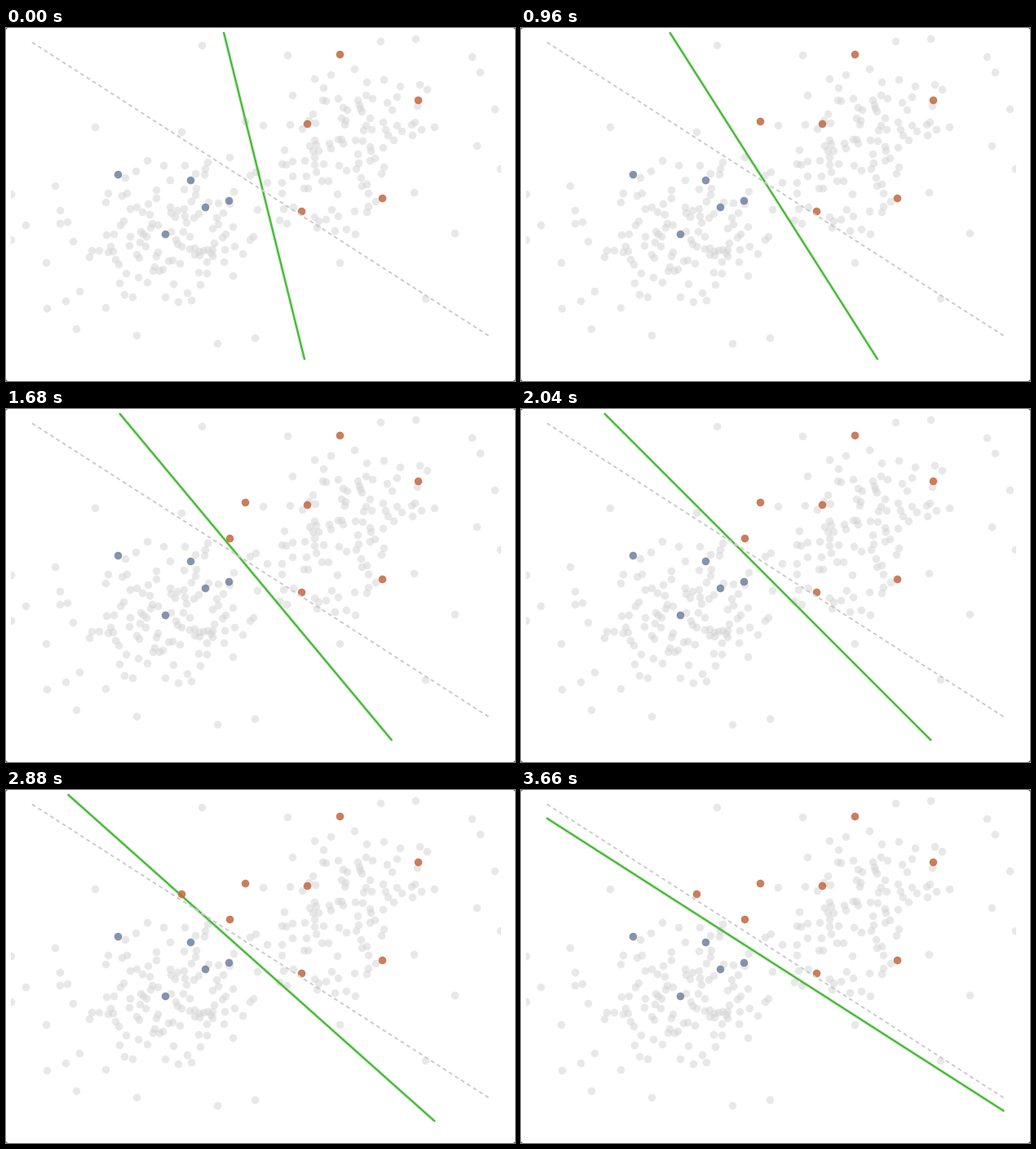
Animation of 624x432 px, one loop 3.72 s. Source, as a matplotlib script:

```python
import numpy as np
import matplotlib.pyplot as plt
from matplotlib.animation import FuncAnimation
from matplotlib.patches import FancyBboxPatch, Rectangle

W, H, DPI = 624, 432, 100
STEP, FRAMES = 60, 62
TURN = 1020  # ms for one swing of the boundary
PT = 72 / DPI  # points per pixel

GREY, RED, BLUE, GREEN = "#d3d3d3", "#c0683f", "#6f80a0", "#45b835"
LEFT, RIGHT, TOP, BOTTOM, MID = 32, 591.5, 6, 405, 206

reds = [(408.5, 31.5), (505, 88), (369, 116.5), (461, 207.5), (362, 223.5)]
blues = [(137, 178.5), (226, 186), (243.5, 218.5), (273, 210.5), (195, 251.5)]

# Newly labelled points: time, x, y; each one starts a swing
queries = [(240, 293, 113.5), (1320, 274, 158), (2640, 215, 127)]

# Boundary poses: angle from the vertical in degrees, x at mid height
poses = np.array([(13.9, 316.6), (37.1, 308.5), (47, 301.6), (57.4, 299.8)])

# Loners on the rim of the clouds
rim = [(240, 21), (345, 33), (459, 16), (502, 13), (571, 35), (581, 54),
       (599, 99), (577, 144), (606, 172), (550, 251), (514, 331), (409, 287),
       (305, 379), (259, 386), (160, 376), (86, 368), (50, 343), (24, 241),
       (6, 203), (6, 259), (60, 193), (109, 121)]


def cloud(rng, n, center, spread, tilt, reach=2.2, gap=4):
    """Tilted Gaussian cloud without far tails, dots kept slightly apart."""
    pts = reds + blues + [q[1:] for q in queries]
    skip = len(pts)
    while len(pts) < skip + n:
        u, v = rng.normal(size=2)
        p = (center[0] + spread[0] * u, center[1] + spread[1] * (v + tilt * u))
        near = np.hypot(*(np.array(pts) - p).T).min()
        if np.hypot(u, v) < reach and near > gap:
            pts.append(p)
    return pts[skip:]


def boundary(now):
    pose = poses[0].copy()
    for (start, _, _), change in zip(queries, np.diff(poses, axis=0)):
        p = np.clip((now - start) / TURN, 0, 1)
        pose += change * (1 - np.cos(np.pi * p)) / 2
    run = np.tan(np.radians(pose[0]))
    y = np.array([max(TOP, MID + (LEFT - pose[1]) / run),
                  min(BOTTOM, MID + (RIGHT - pose[1]) / run)])
    return pose[1] + run * (y - MID), y


fig = plt.figure(figsize=(W / DPI, H / DPI), dpi=DPI, facecolor="#555555")
ax = fig.add_axes([0, 0, 1, 1])
ax.set(xlim=(0, W), ylim=(H, 0))
ax.axis("off")
ax.add_patch(FancyBboxPatch((0, 0), W, H, fc="white", ec="none", zorder=0,
                            boxstyle="round,pad=0,rounding_size=3"))
panel = Rectangle((6, 6), 600, 400, transform=ax.transData)


def dots(pts, color, alpha=0.85, z=3):
    x, y = np.array(pts, float).T
    art = ax.scatter(x, y, s=(9.6 * PT) ** 2, c=color, linewidths=0,
                     alpha=alpha, zorder=z)
    art.set_clip_path(panel)
    return art


def grey_dots(pts):
    return dots(pts, GREY, alpha=0.5, z=1)


rng = np.random.default_rng(12)
grey_dots(rim)
grey_dots(cloud(rng, 130, (188, 252), (73, 43), -0.35))
grey_dots(cloud(rng, 112, (415, 148), (61, 52), -0.35))
dots(reds, RED)
dots(blues, BLUE)
plain = [grey_dots([q[1:]]) for q in queries]
marked = [dots([q[1:]], RED) for q in queries]

glow, = ax.plot([], [], color=GREEN, alpha=0.18, lw=4.6 * PT, zorder=2,
                solid_capstyle="butt")
line, = ax.plot([], [], color=GREEN, lw=2.2 * PT, zorder=2,
                solid_capstyle="projecting")
ax.plot([LEFT, RIGHT], [17.5, 376.5], color="#cccccc", lw=2 * PT, zorder=4,
        dashes=(2.4, 2), dash_capstyle="butt")


def draw(i):
    now = i * STEP
    for art in (glow, line):
        art.set_data(*boundary(now))
    for (start, _, _), grey, red in zip(queries, plain, marked):
        grey.set_visible(now < start)
        red.set_visible(now >= start)
    return [glow, line, *plain, *marked]


anim = FuncAnimation(fig, draw, frames=FRAMES, interval=STEP, repeat=True,
                     repeat_delay=0, blit=False)
plt.show()
```
